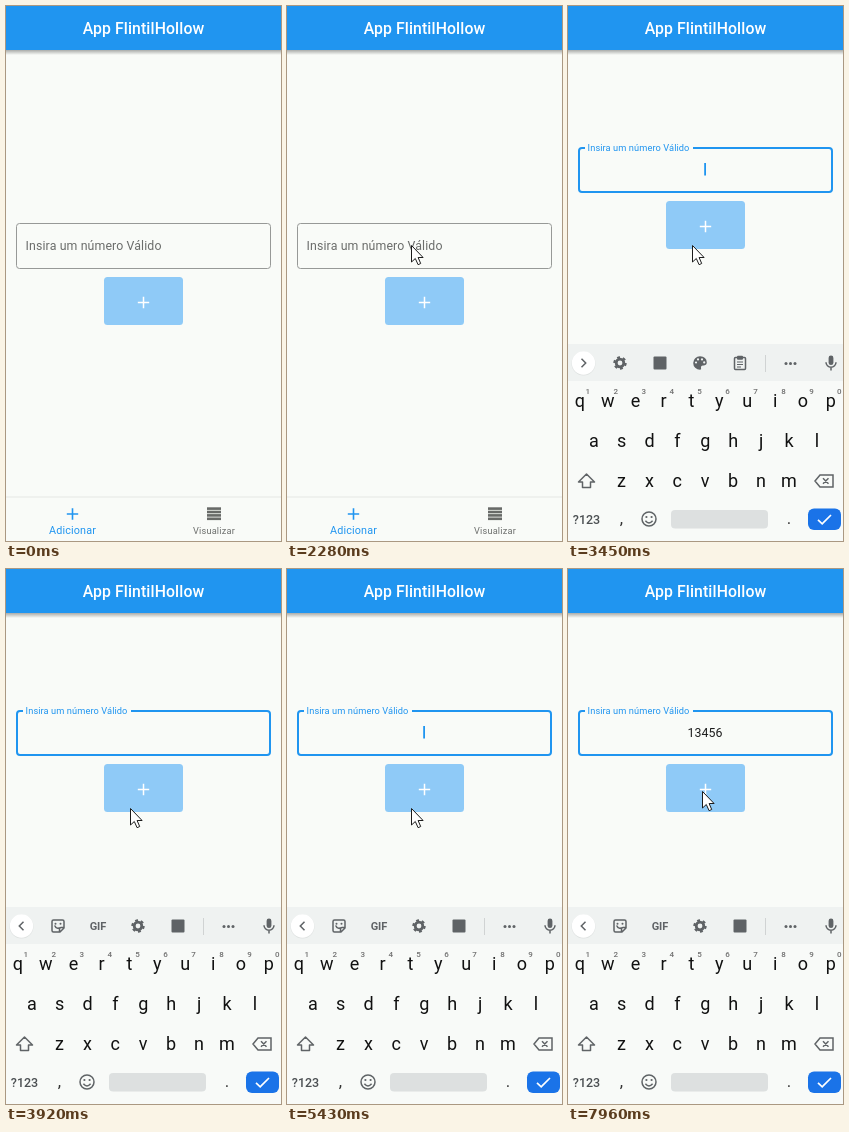
An HTML page that plays this animation: 275 by 535 pixels, repeating every 8 s.

```html
<!DOCTYPE html>
<html lang="pt">
<head>
<meta charset="utf-8">
<title>App</title>
<style>
  html, body { margin: 0; width: 100%; height: 100%; overflow: hidden; background: #f9fbf8; }
  svg { display: block; font-family: Roboto, "Noto Sans", sans-serif; }
  .mid { text-anchor: middle; }
  .line { fill: none; stroke: #5f6366; stroke-width: 1.5; }
  .round { stroke-linecap: round; stroke-linejoin: round; }
  .dark { fill: #5f6366; }
</style>
</head>
<body>
<svg id="stage" width="275" height="535" viewBox="0 0 275 535"></svg>
<script>
const LOOP = 8000;
const BLUE = '#2095f0';
const FOCUS = 3050;
const OPEN = 3380;
const KEYS = [[6050, '1'], [6350, '3'], [6650, '4'], [6950, '5'], [7300, '6']];
const POINTER = [
  [650, 237, 535], [1240, 123.5, 257.5], [1330, 123.5, 257.5], [1700, 124.5, 239.5],
  [7500, 124.5, 239.5], [7940, 134.5, 222.5], [LOOP, 134.5, 222.5]
];

const at = (x, y, body, id = '') =>
  `<g ${id && `id="${id}"`} transform="translate(${x} ${y})">${body}</g>`;
const text = (x, y, size, fill, body, more = '') =>
  `<text x="${x}" y="${y}" font-size="${size}" fill="${fill}" ${more}>${body}</text>`;
const plus = (color, width) =>
  `<path d="M-5.7 0H5.7M0 -5.7V5.7" stroke="${color}" stroke-width="${width}"/>`;

const icons = {
  gear: `<circle class="line" r="3.8" style="stroke-width:2.8"/>
    <circle class="line" r="5.6" pathLength="12" stroke-dasharray="1 1" style="stroke-width:2.2"/>`,
  translate: '<rect class="dark" x="-6.5" y="-6.5" width="13" height="13" rx="1"/>',
  sticker: `<path class="line round" d="M-4.5 -6H4.5Q6 -6 6 -4.5V2L2 6H-4.5Q-6 6 -6 4.5V-4.5Q-6 -6 -4.5 -6ZM6 1.5H3Q1.5 1.5 1.5 3V6M-3 0Q-2 3 1 2"/>
    <circle class="dark" cx="-2.5" cy="-2.3" r="1"/><circle class="dark" cx="2.5" cy="-2.3" r="1"/>`,
  palette: `<path class="dark" d="M0 -6.8A6.8 6.8 0 0 0 0 6.8Q1.7 6.6 1 4.8Q.6 2.5 3 2.4H4Q6.8 2 6.8 -.5Q6.5 -6.6 0 -6.8Z"/>`
    + [[-4, -.5], [-2, -3.6], [2, -3.6], [4.2, -.6]].map(([x, y]) =>
      `<circle cx="${x}" cy="${y}" r="1.1" fill="#eff2f1"/>`).join(''),
  clipboard: `<rect class="line" x="-5.5" y="-5.5" width="11" height="12" rx="1"/>
    <path class="line" d="M-3 -1H3M-3 1.5H3M-3 4H1" style="stroke-width:1.2"/>
    <rect class="dark" x="-3" y="-7.3" width="6" height="4" rx="1"/>`,
  gif: text(0, 4, 11, '#5f6366', 'GIF', 'class="mid" font-weight="700"'),
  dots: [-4.5, 0, 4.5].map(x => `<circle class="dark" cx="${x}" r="1.5"/>`).join(''),
  mic: `<rect class="dark" x="-2.4" y="-7.5" width="4.8" height="9.6" rx="2.4"/>
    <path class="line" d="M-5 -.8A5 5 0 0 0 5 -.8M0 4.2V7.5"/>`,
  smile: `<circle class="line" r="7"/><path class="line" d="M-3.6 1.8Q0 6 3.6 1.8"/>
    <circle class="dark" cx="-2.6" cy="-2" r="1.1"/><circle class="dark" cx="2.6" cy="-2" r="1.1"/>`
};

const letters = (row, x, y) => [...row].map((c, i) =>
  text(x + i * 27.9, y, 18, '#111', c, 'class="mid"')).join('');

function header() {
  return `<defs><linearGradient id="shade" x2="0" y2="1">
      <stop stop-color="#000" stop-opacity=".32"/><stop offset="1" stop-color="#000" stop-opacity="0"/>
    </linearGradient></defs>
    <rect y="44" width="275" height="5" fill="url(#shade)"/>
    <rect width="275" height="44" fill="${BLUE}"/>`
    + text(137.5, 27.7, 15.8, '#fff', 'App FlintilHollow', 'class="mid" font-weight="500" letter-spacing=".11"');
}

function form() {
  return `<g id="form">
    <rect id="box" rx="3" fill="none"/>
    <rect id="gap" x="17" y="216" width="108" height="4" fill="#f9fbf8"/>`
    + at(19.6, 244, text(0, 0, 12.35, 'inherit', 'Insira um número Válido', 'letter-spacing=".11"'), 'label')
    + text(137, 244, 12.35, '#1d1d1d', '', 'id="value" class="mid" letter-spacing=".11"')
    + `<rect id="caret" y="233" width="1.8" height="12.5" fill="${BLUE}"/>
    <rect x="98" y="271" width="79" height="48" rx="3.5" fill="#8fcaf7"/>`
    + at(137.5, 296.5, plus('#fff', 1.5)) + '</g>';
}

function nav() {
  return `<rect y="491" width="275" height="44" fill="#f9fbf8"/>
    <rect y="490.5" width="275" height="1" fill="#e6e8e6"/>`
    + at(66.5, 508, plus(BLUE, 1.6))
    + text(66.5, 527.8, 10.8, BLUE, 'Adicionar', 'class="mid" letter-spacing=".15"')
    + [0, 1, 2, 3].map(i => `<rect x="201" y="${501.3 + i * 3.4}" width="14" height="2.6" fill="#686a68"/>`).join('')
    + text(208, 527.8, 9.2, '#6d6f6d', 'Visualizar', 'class="mid" letter-spacing=".2"');
}

function keyboard() {
  const digits = [...'1234567890'].map((c, i) =>
    text(19.8 + i * 27.95, 388.3, 8, '#707070', c, 'class="mid" font-weight="500"')).join('');
  return `<g id="keyboard">
    <rect y="338" width="275" height="200" fill="#f8faf8"/>
    <rect y="338" width="275" height="37" fill="#eff2f1"/>
    <circle cx="15.5" cy="357.5" r="12" fill="#dfe2e1"/><circle cx="15.5" cy="357" r="11.7" fill="#fff"/>`
    + at(15.5, 357, '<path id="chevron" class="line" d="M2 -4.2L-2.2 0L2 4.2"/>')
    + at(0, 357, at(52, 0, icons.sticker) + at(92, 0, icons.gif), 'extra')
    + at(0, 357, at(132, 0, icons.gear) + at(172, 0, icons.translate), 'tools')
    + at(0, 357, at(212, 0, icons.palette) + at(252, 0, icons.clipboard), 'spare')
    + '<rect x="197" y="349" width="1" height="17" fill="#d0d3d3"/>'
    + at(222.5, 357.5, icons.dots) + at(263, 357, icons.mic)
    + letters('qwertyuiop', 11.8, 401) + digits
    + letters('asdfghjkl', 25.8, 440.5) + letters('zxcvbnm', 53.5, 480.5)
    + at(18.5, 475, '<path class="line" d="M0 -7L8 1H4V6.5H-4V1H-8Z" stroke-linejoin="round"/>')
    + at(256, 475, '<path class="line" d="M-4 -6H9V6H-4L-9 0ZM-1 -2.7L4.5 2.7M4.5 -2.7L-1 2.7"/>')
    + text(18.5, 518, 12.5, '#4c5053', '?123', 'class="mid" font-weight="500"')
    + text(53.5, 518, 17, '#333', ',', 'class="mid"')
    + at(81, 513, icons.smile)
    + '<rect x="103" y="504" width="97" height="18.5" rx="4" fill="#dde0e0"/>'
    + text(221, 518, 17, '#333', '.', 'class="mid"')
    + '<rect x="240" y="502.5" width="33" height="21.5" rx="6" fill="#1a73e8"/>'
    + at(256.5, 513.5, '<path d="M-6.5 .3L-2.3 4.3L6.5 -4.5" fill="none" stroke="#fff" stroke-width="1.7"/>')
    + '</g>';
}

const arrow = at(0, 0, '<path d="M0 0V16.5L3.8 13L6.6 19.2L9.2 18L6.6 12H11.6Z" fill="#fff" stroke="#1c1c1c" stroke-width="1" stroke-linejoin="round"/>', 'pointer');

document.getElementById('stage').innerHTML =
  '<rect width="275" height="535" fill="#f9fbf8"/>' + header() + form() + nav() + keyboard() + arrow;

const $ = id => document.getElementById(id);
const set = (id, attrs) => Object.entries(attrs).forEach(([k, v]) => $(id).setAttribute(k, v));
const show = (id, on) => set(id, { visibility: on ? 'visible' : 'hidden' });
const move = (id, x, y, more = '') => set(id, { transform: `translate(${x} ${y}) ${more}` });
const mix = (a, b, p) => a + (b - a) * p;
const ease = (t, start, length) => {
  const p = Math.min(1, Math.max(0, (t - start) / length));
  return p * p * (3 - 2 * p);
};

// The outline grows inwards, so its outer edge stays in place.
function drawBox(focused) {
  const width = focused ? 2 : 1;
  set('box', {
    x: 10 + width / 2, y: 217 + width / 2, width: 255 - width, height: 46 - width,
    stroke: focused ? BLUE : '#979997', 'stroke-width': width
  });
}

function drawField(t) {
  const focused = t >= FOCUS;
  const float = ease(t, FOCUS, 170);
  move('form', 0, t >= OPEN ? -76 : 0);
  drawBox(focused);
  show('gap', float > .3);
  move('label', 19.6, mix(244, 220.7, float), `scale(${mix(1, .75, float)})`);
  set('label', { fill: focused ? BLUE : '#6b6d6b' });

  const typed = KEYS.filter(([time]) => time <= t);
  $('value').textContent = typed.map(key => key[1]).join('');
  const last = typed.length ? typed[typed.length - 1][0] : FOCUS;
  const width = typed.length ? $('value').getComputedTextLength() : 0;
  set('caret', { x: 136.2 + width / 2 });
  show('caret', focused && Math.floor((t - last) / 500) % 2 === 0);
}

function drawKeyboard(t) {
  const opened = t >= OPEN;
  const slide = ease(t, 3450, 300);
  show('keyboard', t >= 3250);
  move('keyboard', 0, opened ? 0 : 57);
  set('keyboard', { opacity: opened ? 1 : .6 });
  const shift = mix(-80, 0, slide);
  ['extra', 'tools', 'spare'].forEach(id => move(id, shift, 357));
  set('extra', { opacity: slide });
  set('spare', { opacity: 1 - slide });
  set('chevron', { transform: `rotate(${180 * (1 - slide)})` });
}

function drawPointer(t) {
  const i = POINTER.findIndex(([time]) => time > t);
  show('pointer', i > 0);
  if (i < 1) return;
  const [start, x0, y0] = POINTER[i - 1];
  const [end, x1, y1] = POINTER[i];
  const p = ease(t, start, end - start);
  move('pointer', mix(x0, x1, p), mix(y0, y1, p));
}

function draw(t) {
  drawField(t);
  drawKeyboard(t);
  drawPointer(t);
}

const begin = performance.now();
function frame() {
  draw((performance.now() - begin) % LOOP);
  requestAnimationFrame(frame);
}
frame();
</script>
</body>
</html>
```
